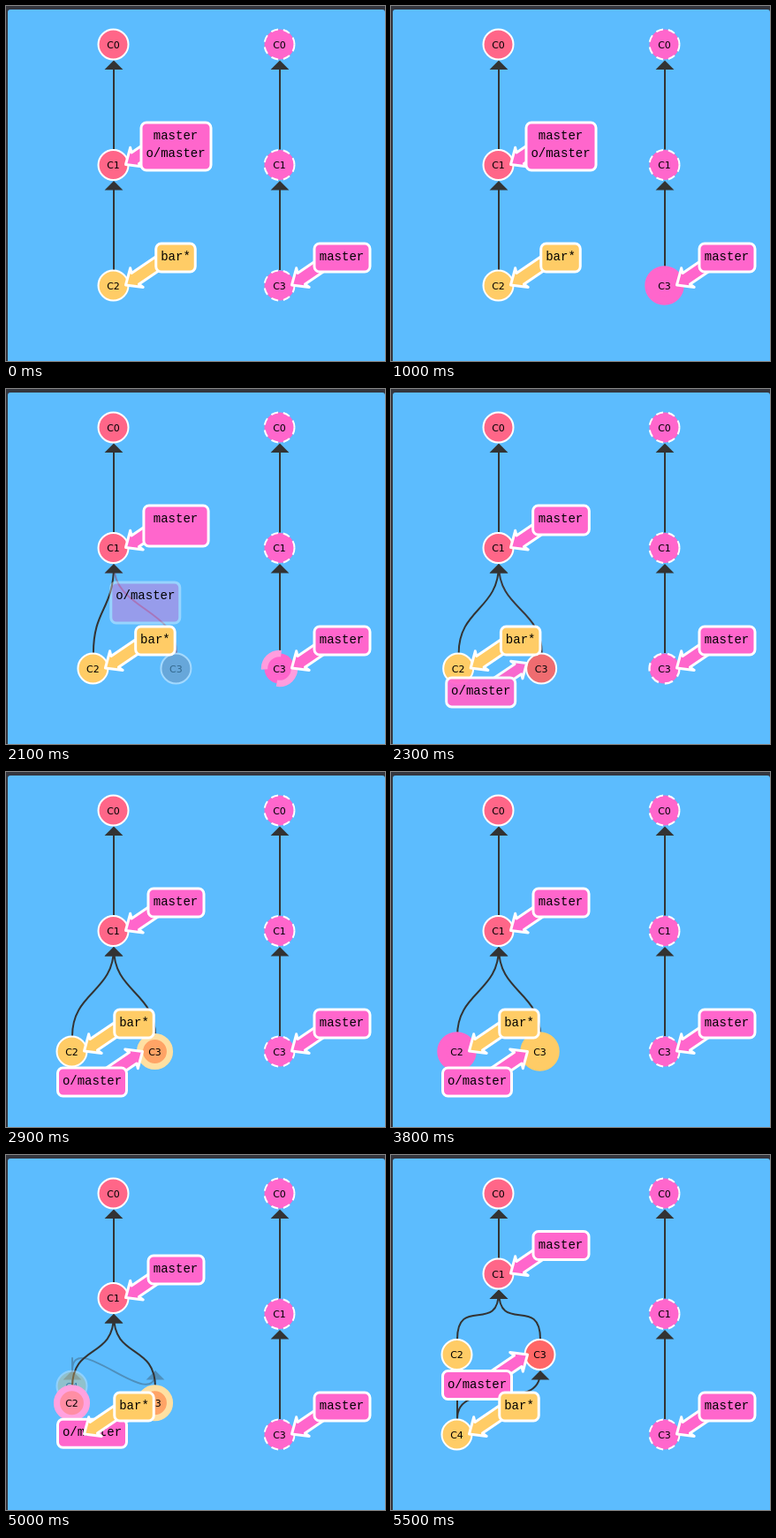
An HTML page that plays this animation: 429 by 402 pixels, repeating every 6.9 s.

```html
<!DOCTYPE html>
<html lang="en">
<head>
<meta charset="utf-8">
<title>Commit tree</title>
<style>
  html, body { margin: 0; width: 100%; height: 100%; overflow: hidden; background: #34363e; }
  svg { display: block; width: 429px; height: 402px; }
  text { text-anchor: middle; fill: #000; white-space: pre; }
  .id { font: 11px "DejaVu Sans", sans-serif; }
  .tag { font: 14px "Courier New", "Liberation Mono", monospace; }
  .line { stroke-width: 2; }
  .label { stroke: #fff; stroke-width: 3; stroke-linejoin: round; }
</style>
</head>
<body>
<svg id="stage" viewBox="0 0 429 402"></svg>
<script>
const LOOP = 6900, STEP = 100;
const WHITE = [255, 255, 255], PINK = [255, 102, 204], YELLOW = [255, 204, 102],
      ROSE = [255, 102, 136], RED = [255, 102, 102], INK = [51, 51, 51];
const LEFT = 121.5, RIGHT = 309.5, BEND = 50;
const stage = document.getElementById('stage');

const clamp = u => Math.min(1, Math.max(0, u));
const ease = u => u < .5 ? 2 * u * u : 1 - 2 * (1 - u) * (1 - u);
const lerp = (a, b, p) => a + (b - a) * p;
const mix = (a, b, p) => a.map((v, i) => lerp(v, b[i], p));
const rgb = c => `rgb(${c.map(Math.round)})`;
const fade = (opacity, body) => `<g opacity="${opacity}">${body}</g>`;

// A commit; glow widens its ring and tints it with the glow colour.
function node(n) {
  const glow = n.glow || 0, tint = n.tint || n.fill, width = 2 + 8.5 * glow;
  const dash = n.dashed ? `stroke-dasharray="${4 * width} ${3 * width}"` : '';
  return `<circle cx="${n.x}" cy="${n.y}" r="17" fill="${rgb(mix(n.fill, tint, glow))}"
    stroke="${rgb(mix(WHITE, tint, glow))}" stroke-width="${width}" ${dash}/>
    <text class="id" x="${n.x}" y="${n.y + 4}">${n.id}</text>`;
}

// The link from a commit up to its parent, ending at the arrowhead's apex.
function edge(child, parent, color = INK) {
  const x1 = child.x + .5, y1 = child.y - 17.5, x2 = parent.x + .5, y2 = parent.y + 19.5;
  const c = rgb(color);
  return `<path class="line" fill="none" stroke="${c}"
    d="M${x1} ${y1}C${x1} ${y1 - BEND} ${x2} ${y2 + BEND} ${x2} ${y2}"/>
    <path class="line" fill="${c}" stroke="${c}" d="M${x2} ${y2}l8 8h-16z"/>`;
}

// Pointer with its tip at x, y; a negative size turns it around.
function arrow(x, y, size, fill) {
  const shape = [[0, 0], [15, 13], [13, 7.5], [45, 7.5], [45, -7.5], [13, -7.5], [15, -13]];
  const points = shape.map(([a, b]) =>
    [x + size * (.83 * a + .56 * b), y + size * (-.56 * a + .83 * b)]);
  return `<polygon class="label" fill="${rgb(fill)}" points="${points.join(' ')}"/>`;
}

const box = (cx, y, w, h, fill) =>
  `<rect class="label" x="${cx - w / 2}" y="${y}" width="${w}" height="${h}" rx="6" fill="${rgb(fill)}"/>`;
const word = (s, x, top) => `<text class="tag" x="${x}" y="${top + 19}">${s}</text>`;

function draw(t) {
  const p = (from, to) => ease(clamp((t - from) / (to - from)));
  const drift = clamp((t - 1250) / 650) ** 2;
  const split = p(1900, 2370);
  const lift = p(4680, 5400);
  const calm = 1 - lift;
  const born = p(4680, 5480);
  const parted = t >= 2000;

  // right tree
  const r0 = { id: 'C0', x: RIGHT, y: 43.5, fill: PINK, dashed: true };
  const r1 = { id: 'C1', x: RIGHT, y: 180, fill: PINK, dashed: true };
  const r3 = { id: 'C3', x: RIGHT, y: 316.5, fill: PINK, dashed: t < 500 || parted,
               glow: p(420, 1000) * (1 - split) };

  // left tree
  const x2 = lerp(LEFT - 9.5 * drift, LEFT - 47, split);
  const y2 = 316.5 - 90.5 * lift;
  const c0 = { id: 'C0', x: LEFT, y: 43.5, fill: ROSE };
  const c1 = { id: 'C1', x: LEFT, y: 180 - 45.5 * lift, fill: ROSE };
  const c2 = { id: 'C2', x: x2, y: y2, fill: YELLOW, tint: PINK, glow: p(3330, 3800) * calm };
  const c3 = { id: 'C3', x: x2 + 94, y: y2, fill: mix([40, 163, 213], RED, split),
               tint: YELLOW, glow: p(2650, 3100) * calm };
  const c4 = { id: 'C4', x: x2, y: 226 + 90.5 * lift, fill: YELLOW };
  const shown3 = .12 * drift + .88 * split;
  const settled = n => ({ x: n.x, y: 226 });

  // tags
  const top = 132 - 45.5 * lift;
  const height = lerp(54, 32, split);
  const farX = lerp(192, 97.5, split);
  const farY = lerp(153, 335, split) - 90.5 * lift;
  const tipX = lerp(LEFT + 14, 154.5, split);
  const tipY = lerp(179.5, 316.5, split) - 90.5 * lift;
  const barX = 192 + x2 - LEFT;

  stage.innerHTML = [
    '<rect x="2" y="4" width="427" height="410" rx="3" fill="#5cbcfe"/>',
    edge(r1, r0), edge(r3, r1), edge(c1, c0),
    fade(shown3, edge(c3, c1, mix([208, 48, 96], INK, split))), edge(c2, c1),
    fade(born, edge(c4, settled(c2)) + edge(c4, settled(c3))),
    node(r0), node(r1), node(r3), node(c0), node(c1),
    fade(shown3, node(c3)), fade(born, node(c4)), node(c2),

    arrow(RIGHT + 14, 316, 1, PINK), box(380.5, 269, 63, 32, PINK), word('master', 380, 269),

    arrow(LEFT + 14, c1.y - .5, 1, PINK),
    box(192.5, top, lerp(79, 63, split), height, PINK), word('master', 192, top),
    parted ? '' : word('o/master', 192, top + 20),

    parted ? fade(split, arrow(tipX, tipY, 1 - 2 * split, PINK) + box(farX, farY, 78, height, PINK)) +
      word('o/master', farX, farY) : '',

    arrow(x2 + 14, 316, 1, YELLOW), box(barX, 269, 44.5, 32, YELLOW), word('bar*', barX, 269)
  ].join('');
}

let last = -1;
function tick() {
  const t = Math.floor(performance.now() % LOOP / STEP) * STEP;
  if (t !== last) draw(last = t);
  requestAnimationFrame(tick);
}
tick();
</script>
</body>
</html>
```
